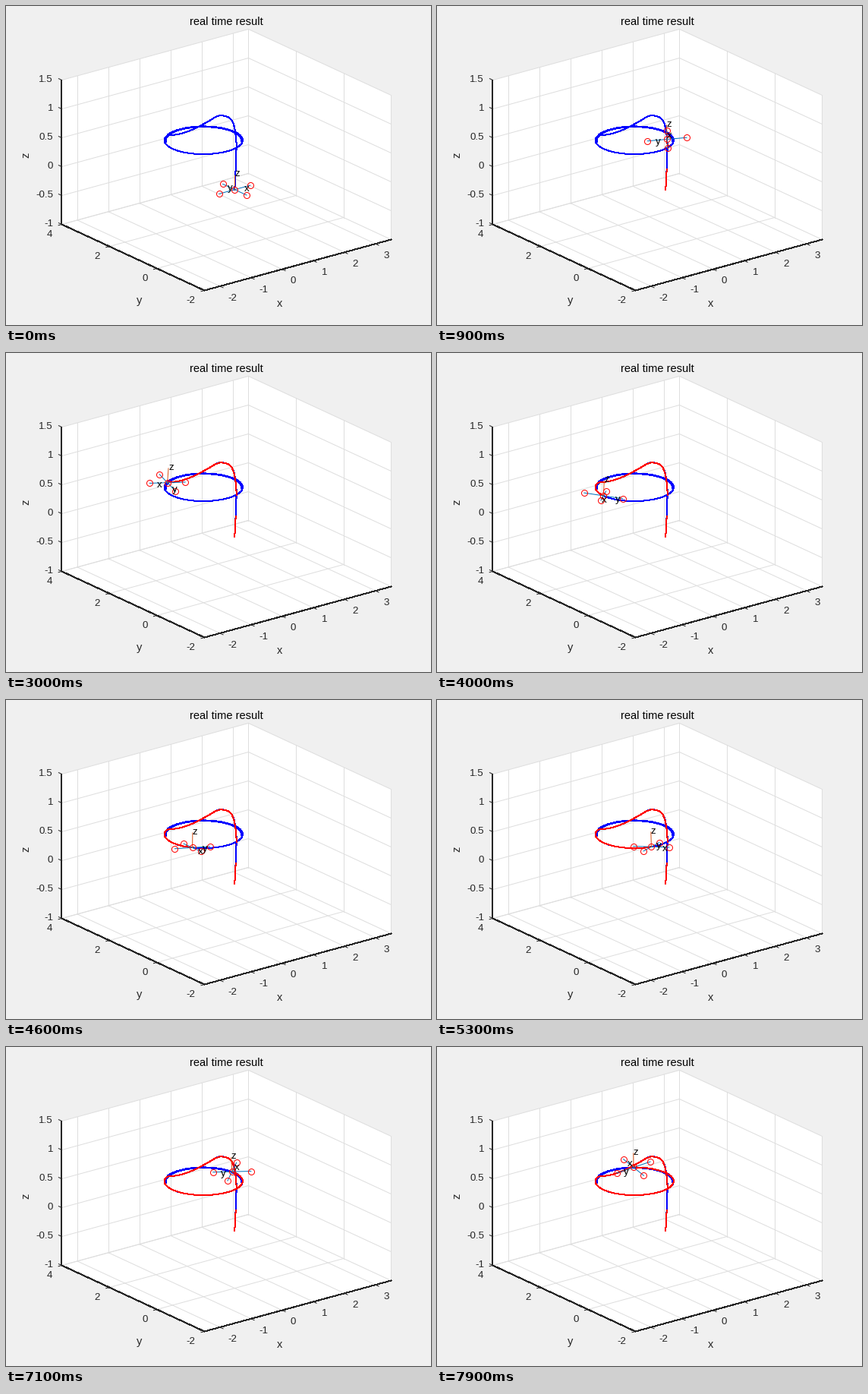
These frames come from a looping animation (560 by 420 pixels, 8000 ms). A matplotlib script:

```python
import numpy as np
import matplotlib.pyplot as plt
from matplotlib.animation import FuncAnimation

W, H, DPI = 560, 420, 100
FRAMES, STEP = 80, 100
INK = "#262626"
BLUE, RED = "#0000ff", "#ff0000"
ARM, MAST = "#0072bd", "#d95319"

# Screen vectors of one unit along x, y and z
AXES = np.array([[41.0, -11.17], [-31.33, -14.5], [0.0, -76.0]])
ORIGIN = np.array([300.8, 241.1])
X0, X1, Y0, Y1, Z0, Z1 = -2.5, 3.5, -2, 4, -1, 1.5

# Climb and overshoot, one knot every 0.3 s, ending on the circle
KNOTS = np.array([
    [300.8, 241.2], [301.4, 229.5], [302.6, 203], [302.7, 175], [297, 150],
    [281.5, 143.8], [264.8, 152.2], [248, 161], [232, 167], [219, 169.5],
    [212.2, 170.2], [208.4, 174.9], [209.6, 180.6]])
YAW_T = [0, 0.9, 1.8, 3.0, 4.0, 5.3, 7.1, 7.9]
YAW = [0, 54, 109.5, 166.7, 225, 298.7, 399.5, 444]


def project(p):
    return ORIGIN + np.asarray(p, float) @ AXES


def circle(phi, r=1.0):
    return project([r * np.cos(phi) - 1, r * np.sin(phi), 1])


def position(t):
    if t >= 3.3:
        return circle(np.radians(60 * (t - 1)))
    i = int(t / 0.3 + 1e-9)
    u = t / 0.3 - i
    a, b, c, d = (KNOTS[max(i + k, 0)] for k in (-1, 0, 1, 2))
    return b + 0.5 * u * (c - a + u * (2 * a - 5 * b + 4 * c - d
                                       + u * (3 * (b - c) + d - a)))


def attitude(t):
    yaw = np.radians(np.interp(t, YAW_T, YAW))
    lean = min(1, t / 1.2)
    rise, drop = 0.08 * lean, -0.07 * lean
    ex = np.array([np.cos(yaw), np.sin(yaw), rise])
    ey = np.array([-np.sin(yaw), np.cos(yaw), drop])
    ex, ey = ex / np.linalg.norm(ex), ey / np.linalg.norm(ey)
    return np.array([ex, ey, np.cross(ex, ey)])


fig = plt.figure(figsize=(W / DPI, H / DPI), dpi=DPI, facecolor="#f0f0f0")
ax = fig.add_axes([0, 0, 1, 1])
ax.set_xlim(-0.5, W - 0.5)
ax.set_ylim(H - 0.5, -0.5)
ax.axis("off")


def px(n):
    return n * 72 / DPI


def line(pts, color, aa=True, **kw):
    pts = np.asarray(pts, float).reshape(-1, 2)
    return ax.plot(pts[:, 0], pts[:, 1], color=color, lw=px(1),
                   antialiased=aa, **kw)[0]


def segment(a, b, color, **kw):
    line([project(a), project(b)], color, **kw)


def label(x, y, s, size=13.33, color=INK, ha="center", **kw):
    return ax.text(x, y + 0.36 * size, s, fontsize=px(size), color=color,
                   ha=ha, va="baseline", family="Liberation Sans", **kw)


def tick(p, direction):
    a = project(p)
    line([a, a + 4.5 * direction / np.linalg.norm(direction)], INK)


def draw_box():
    walls = (
        [(X0, Y0, Z0), (X1, Y0, Z0), (X1, Y1, Z0), (X0, Y1, Z0)],
        [(X0, Y1, Z0), (X1, Y1, Z0), (X1, Y1, Z1), (X0, Y1, Z1)],
        [(X1, Y0, Z0), (X1, Y1, Z0), (X1, Y1, Z1), (X1, Y0, Z1)])
    for wall in walls:
        ax.fill(*project(wall).T, color="white", lw=0)

    grid = "#dedede"
    for x in range(-2, 4):
        segment((x, Y0, Z0), (x, Y1, Z0), grid)
        segment((x, Y1, Z0), (x, Y1, Z1), grid)
        tick((x, Y0, Z0), -AXES[1])
        cx, cy = project((x, Y0, Z0))
        label(cx + 16 - 1.5 * (x >= 0), cy + 14, str(x))
    for y in range(-2, 5, 2):
        segment((X0, y, Z0), (X1, y, Z0), grid)
        segment((X1, y, Z0), (X1, y, Z1), grid)
        tick((X0, y, Z0), -AXES[0])
        cx, cy = project((X0, y, Z0))
        label(cx - 16 - 2 * (y < 0), cy + 12, str(y))
    for z in np.arange(Z0, Z1 + 0.1, 0.5):
        segment((X0, Y1, z), (X1, Y1, z), grid)
        segment((X1, Y0, z), (X1, Y1, z), grid)
        tick((X0, Y1, z), AXES[1])
        label(61.5, project((X0, Y1, z))[1] - 2.5, f"{z:g}", ha="right")

    corners = [(X0, Y1, Z1), (X0, Y1, Z0), (X0, Y0, Z0), (X1, Y0, Z0)]
    line(project(corners), INK, aa=False)
    label(290, 19, "real time result", 14.67, "black")
    label(360.5, 390, "x", 14.67)
    label(175.5, 386, "y", 14.67)
    label(31 - 5.3, 191, "z", 14.67, rotation=90)


draw_box()

flight = [position(t) for t in np.arange(0, 9, 0.02)]
line(flight, BLUE, aa=False)
line([circle(p, 0.965) for p in np.radians(np.arange(-40, 150, 3))],
     BLUE, aa=False)

trail = line([(0, 0)], RED, aa=False)
climb = line([(0, 0)], BLUE, aa=False)
arms = [line([(0, 0)], ARM) for _ in range(2)]
mast = line([(0, 0)], MAST)
rotors = line([(0, 0)], "none", ls="none", marker="o", ms=px(8),
              mfc="none", mec=RED, mew=px(1))
names = [label(0, 0, s, color="black", ha="left") for s in "xyz"]


def update(i):
    t = i * STEP / 1000
    c = position(t)
    body = attitude(t) @ AXES

    trail.set_data(*np.array([position(k * 0.1) for k in range(i + 1)]).T)
    # The trail leaves this part of the climb uncovered
    gap = np.arange(0.5, min(t, 0.75) + 0.001, 0.05)
    climb.set_data(*np.array([position(s) for s in gap]).reshape(-1, 2).T)

    tips = []
    for arm, v in zip(arms, body):
        ends = [c - v / 2, c + v / 2]
        arm.set_data(*np.array(ends).T)
        tips += ends
    mast.set_data(*np.array([c, c + body[2] / 4]).T)
    rotors.set_data(*np.array(tips + [c]).T)
    for name, v in zip(names, body):
        name.set_position(c + 0.3 * v + [0, 5.5])
    return [trail, climb, *arms, mast, rotors, *names]


anim = FuncAnimation(fig, update, frames=FRAMES, interval=STEP,
                     repeat=True, repeat_delay=0, blit=False)
plt.show()
```
